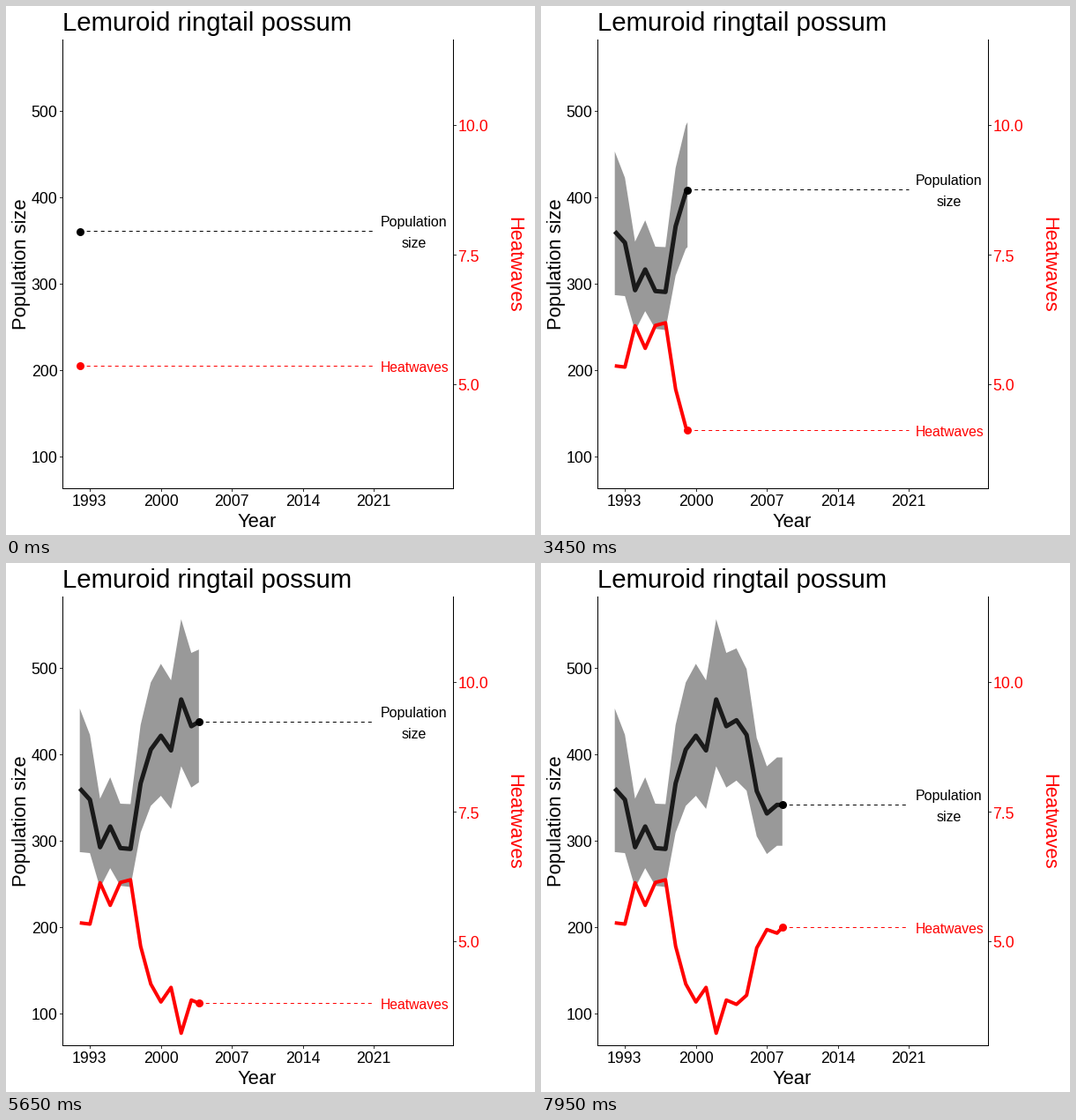
Write a matplotlib script that moves like this. It is 600 px wide and 600 px high and loops after 8000 ms.

```python
import numpy as np
import matplotlib.pyplot as plt
from matplotlib.animation import FuncAnimation

FRAMES, STEP_MS = 160, 50
FRAMES_PER_YEAR = 9.62
PX = 0.72  # points per pixel at 100 dpi
RED = "#ff0000"

plt.rcParams["font.family"] = "Liberation Sans"


def year_x(year):
    return 95.5 + 11.5 * (year - 1993)


def pop_y(value):
    return 609.5 - 0.98 * value


def heat_y(value):
    return 429.5 - 58.8 * (value - 5)


# Yearly population from 1992; the other curves follow from it
pop = np.array([361, 348, 293, 317, 292, 291, 367, 406, 422,
                405, 464, 433, 440, 423, 358, 332, 342, 342])
t = np.arange(pop.size)
spread = 1.18 + 0.02 * np.sin(2 * np.pi * (t - 6) / 14) + 0.085 * np.exp(-t / 2)
heat = (10.97 - pop / 60 + 0.41 * np.exp(-t / 1.2)
        - 0.0136 * t * np.cos(2 * np.pi * (t - 8.4) / 6.5))
curves = np.array([pop_y(pop), pop_y(pop * spread), pop_y(pop / spread),
                   heat_y(heat)])

fig = plt.figure(figsize=(6, 6), dpi=100, facecolor="white")
ax = fig.add_axes([0, 0, 1, 1])
ax.set_xlim(0, 600)
ax.set_ylim(600, 0)
ax.axis("off")


def line(x, y, color, width, **kw):
    return ax.plot(x, y, color=color, lw=width * PX, snap=False,
                   solid_capstyle="butt", solid_joinstyle="round", **kw)[0]


def label(x, y, s, size, color="black", ha="center", rotation=0):
    return ax.text(x, y, s, fontsize=size * PX, color=color, ha=ha,
                   va="baseline", rotation=rotation, rotation_mode="anchor")


def draw_axes():
    for x in (64.5, 507.5):
        line([x, x], [38, 548], "black", 1, zorder=6)
    line([64, 508], [547.5, 547.5], "black", 1, zorder=6)
    for value in range(100, 501, 100):
        y = pop_y(value)
        line([61, 64], [y, y], "#333333", 1)
        label(58.5, y + 7, str(value), 17.6, ha="right")
    for year in range(1993, 2022, 7):
        x = np.floor(year_x(year)) + 0.5
        line([x, x], [548, 551], "#333333", 1)
        label(x - 0.7, 567, str(year), 17.6)
    for value in (5.0, 7.5, 10.0):
        y = heat_y(value)
        line([508, 511], [y, y], "#333333", 1)
        label(512.5, y + 7, f"{value:.1f}", 17.6, RED, "left")
    label(64, 28, "Lemuroid ringtail possum", 29.4, ha="left")
    label(284.5, 591, "Year", 22)
    label(23, 292.5, "Population size", 22, rotation=90)
    label(570.5, 293, "Heatwaves", 22, RED, rotation=-90)


def make_marker(color):
    dash = line([], [], color, 1, zorder=4, linestyle=(0, (4, 4)),
                dash_capstyle="butt")
    dot = ax.plot([], [], "o", color=color, ms=9 * PX, mew=0, zorder=5,
                  snap=False)[0]
    return dash, dot


def move_marker(marker, x, y):
    dash, dot = marker
    row = np.floor(y) + 0.5
    dash.set_data([x, year_x(2021)], [row, row])
    dot.set_data([x], [y])


draw_axes()
ribbon = ax.fill([0], [0], color="#999999", lw=0, zorder=2)[0]
pop_line = line([], [], "#1a1a1a", 5, zorder=3)
heat_line = line([], [], RED, 4, zorder=4)
pop_marker, heat_marker = make_marker("black"), make_marker(RED)
pop_text = [label(463, 0, s, 16) for s in ("Population", "size")]
heat_text = label(463.5, 0, "Heatwaves", 15.7, RED)


def update(k):
    now = k / FRAMES_PER_YEAR
    past = t < now
    head = [np.interp(now, t, c) for c in curves]
    xs = year_x(1992 + np.append(t[past], now)) - 0.3
    mid, high, low, hot = np.column_stack([curves[:, past], head])

    ribbon.set_xy(np.column_stack([np.append(xs, xs[::-1]),
                                   np.append(high, low[::-1])]))
    pop_line.set_data(xs, mid)
    heat_line.set_data(xs, hot)
    move_marker(pop_marker, xs[-1], mid[-1])
    move_marker(heat_marker, xs[-1], hot[-1])
    pop_text[0].set_y(mid[-1] - 5.5)
    pop_text[1].set_y(mid[-1] + 18.5)
    heat_text.set_y(hot[-1] + 6.5)
    return [ribbon, pop_line, heat_line, *pop_marker, *heat_marker,
            *pop_text, heat_text]


anim = FuncAnimation(fig, update, frames=FRAMES, interval=STEP_MS,
                     repeat=True, repeat_delay=0, blit=False)
plt.show()
```
